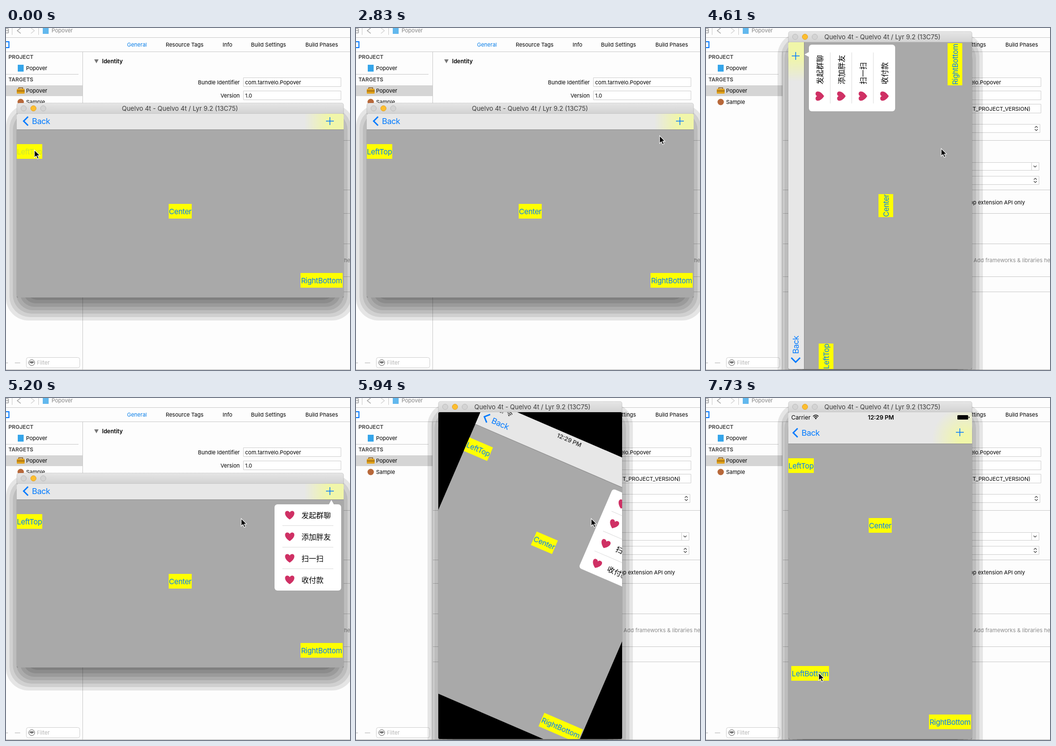
An HTML page for the animation above (8000 ms loop, 702 by 698 pixels).

```html
<!DOCTYPE html>
<html lang="en">
<head>
<meta charset="utf-8">
<title>Popover demo</title>
<style>
html, body { margin: 0; width: 100%; height: 100%; overflow: hidden; background: #fdfdfd; }
svg { display: block; width: 702px; height: 698px; font: 11px Inter, "Noto Sans", sans-serif; }
.bold { font-weight: 600; }
.end { text-anchor: end; }
.mid { text-anchor: middle; }
.rule { stroke: #c9c9c9; fill: none; }
.field { fill: #fff; stroke: #cfcfcf; }
.tint { fill: none; stroke: #007aff; }
.button { font-size: 15px; letter-spacing: -.3px; fill: #007aff; text-anchor: middle; }
.row { font: 15px "Noto Sans CJK SC", "Noto Sans CJK", sans-serif; }
</style>
</head>
<body>
<svg viewBox="0 0 702 698">
  <defs>
    <linearGradient id="glowWide"><stop stop-color="#eff5a8" stop-opacity="0"/><stop offset=".6" stop-color="#f0f6a9"/></linearGradient>
    <radialGradient id="glowTall"><stop offset=".15" stop-color="#f1f7a8"/><stop offset="1" stop-color="#f1f7a8" stop-opacity="0"/></radialGradient>
    <linearGradient id="chrome" x2="0" y2="1"><stop stop-color="#e6e6e6"/><stop offset="1" stop-color="#d2d2d2"/></linearGradient>
    <clipPath id="clip"><rect id="clipBox" rx="3"/></clipPath>
  </defs>

  <!-- editor behind -->
  <rect width="702" height="698" fill="#fdfdfd"/>
  <rect y="117" width="156" height="22" fill="#d5d5d5"/>
  <path class="rule" d="M0 19.5H702M0 48.5H702M156.5 49V697M0 94.5H148M12.5 0V14M66.5 0V14M157 229.5H702M157 330.5H702M157 378.5H702M157 440.5H702M157 507.5H702M157 538.5H702"/>
  <path d="M0 697.5H702" stroke="#b4b4b4"/>
  <path d="M0 1.5H5V10H0M0 5.5H5" fill="none" stroke="#777"/>
  <path d="M30 0L23 5.5L30 11" fill="none" stroke="#999" stroke-width="1.3"/>
  <path d="M51 0L58 5.5L51 11" fill="none" stroke="#d2d2d2" stroke-width="1.3"/>
  <rect x="75" y="-1" width="12" height="13" fill="#62b8ee"/>
  <text x="93" y="9" fill="#858585">Popover</text>
  <rect x="-6" y="28" width="12" height="12" class="tint" stroke-width="2"/>
  <text x="247" y="38" fill="#0a7fe8">General</text>
  <text x="326" y="38">Resource Tags</text>
  <text x="442" y="38">Info</text>
  <text x="500" y="38">Build Settings</text>
  <text x="611" y="38">Build Phases</text>

  <g class="bold" fill="#3d3d3d"><text x="5" y="63">PROJECT</text><text x="5" y="109">TARGETS</text></g>
  <rect x="24" y="75" width="12" height="14" fill="#35a5ea"/>
  <text x="41" y="86">Popover</text>
  <path d="M26 124V122H34V124" fill="none" stroke="#8a5a10" stroke-width="1.5"/>
  <rect x="22" y="124" width="16" height="10" rx="1.5" fill="#e0a01c"/>
  <path d="M22 128.5H38" stroke="#8a5a10" stroke-width="1.5"/>
  <text x="41" y="132">Popover</text>
  <circle cx="30" cy="151" r="6.5" fill="#b8683a"/>
  <text x="41" y="155">Sample</text>
  <path d="M0 683.5H4M18 683.5H29" stroke="#b0b0b0"/>
  <rect x="41.5" y="672.5" width="109" height="21" rx="4" class="field"/>
  <circle cx="52.5" cy="683" r="6" fill="none" stroke="#555"/>
  <path d="M49 681H56V683H49ZM50.5 684.5H54.5" fill="#555" stroke="#555" stroke-width=".8"/>
  <text x="63" y="687" fill="#b5b5b5">Filter</text>

  <path d="M180 64H189L184.5 72Z" fill="#777"/>
  <text x="196" y="72" class="bold" font-size="11.5">Identity</text>
  <text x="477" y="115" class="end">Bundle Identifier</text>
  <text x="477" y="142" class="end">Version</text>
  <path class="field" d="M484.5 101.5H683.5V119.5H484.5ZM484.5 128.5H683.5V146.5H484.5ZM484.5 155.5H683.5V173.5H484.5Z"/>
  <path class="field" d="M484.5 196.5H681.5V213.5H484.5ZM484.5 274.5H679.5V290.5H484.5ZM664.5 274.5V290.5M484.5 302.5H679.5V319.5H484.5Z"/>
  <path d="M671 203.500L674 200.500L677 203.500M671 206.500L674 209.500L677 206.500M668.500 281L671.500 284L674.500 281M669 309.500L672 306.500L675 309.500M669 312.500L672 315.500L675 312.500" fill="none" stroke="#444" stroke-width="1.200"/>
  <text x="488" y="115">com.tarnvelo.Popover</text>
  <text x="488" y="142">1.0</text>
  <text x="662" y="169" class="end">$(CURRENT_PROJECT_VERSION)</text>
  <text x="651" y="360" class="end">Allow app extension API only</text>
  <text x="546" y="478" fill="#8c8c8c">Add frameworks &amp; libraries here</text>

  <!-- simulator window -->
  <g id="shadow"></g>
  <g id="frame">
    <path id="titleBar" fill="url(#chrome)" stroke="#000" stroke-opacity=".12"/>
    <g fill="#d4d4d4" stroke="#bdbdbd"><circle cx="14" cy="11" r="5.500"/><circle cx="54" cy="11" r="5.500"/></g>
    <circle cx="34" cy="11" r="5.500" fill="#fdbe2f" stroke="#e0a32a"/>
    <text id="title" y="15.500" class="mid" font-size="13" fill="#3c3c3c">Quelvo 4t - Quelvo 4t / Lyr 9.2 (13C75)</text>
  </g>
  <g clip-path="url(#clip)">
    <rect width="702" height="698"/>
    <g id="screen">
      <rect id="page" fill="#a9a9a9"/>
      <g id="buttons"></g>
      <rect id="bar" fill="#e7e7e7"/>
      <g id="wideGlow"><rect x="-80" width="80" height="32" fill="url(#glowWide)"/></g>
      <g id="tallGlow"><path d="M-100 0H0V64H-100Z" fill="url(#glowTall)" id="tallFill"/></g>
      <path id="barLine" stroke="#8f8f8f"/>
      <g id="back">
        <path class="tint" stroke-width="2.800" d="M11 1L2 10L11 19"/>
        <text x="19" y="16" font-size="16.500" letter-spacing="-.4" fill="#007aff">Back</text>
      </g>
      <path id="plus" class="tint" stroke-width="1.500" d="M-8 0H8M0-8V8"/>
      <g id="status" font-size="12">
        <text x="6" y="14.500">Carrier</text>
        <path d="M50.500 8.500Q56 3 61.500 8.500M52.500 10.800Q56 7.300 59.500 10.800" fill="none" stroke="#000" stroke-width="1.600"/>
        <path d="M54 12.500Q56 10.500 58 12.500L56 14.500Z"/>
        <text x="189" y="14.500" class="mid bold">12:29 PM</text>
        <rect x="345" y="6" width="22" height="9" rx="1.500"/><rect x="368" y="9" width="1.500" height="3"/>
      </g>
      <g id="popovers"></g>
    </g>
  </g>
  <path id="cursor" d="M0 0V15.500L3.600 12.200L6.200 18L8.800 16.900L6.300 11.200H11Z" stroke="#fff" stroke-width="1.100"/>
</svg>

<script>
const $ = id => document.getElementById(id);
const attr = (id, values) => { for (const k in values) $(id).setAttribute(k, values[k]); };
const move = (id, x, y) => attr(id, { transform: `translate(${x} ${y})` });
const lerp = (a, b, k) => a + (b - a) * k;

const button = (id, width) => `<g id="${id}"><rect width="${width}" height="30" fill="#ff0"/>
  <text class="button" id="${id}Text" x="${width / 2}" y="20.5">${id}</text></g>`;
$('buttons').innerHTML = button('LeftTop', 52) + button('Center', 47) +
  button('RightBottom', 86) + button('LeftBottom', 77);

const heart = 'M0 9C-12.500 1-11-8.500-5-8.500C-2.500-8.500-.8-7.200 0-5.200C.8-7.200 2.500-8.500 5-8.500C11-8.500 12.500 1 0 9Z';
const popover = (id, tip) => `<g id="${id}">
  <path fill="#fff" d="M${tip - 5.5} 1L${tip} -9L${tip + 5.5} 1Z"/><rect width="136" height="176" rx="6" fill="#fff"/>` +
  ['发起群聊', '添加胖友', '扫一扫', '收付款'].map((label, i) => `<g transform="translate(0 ${i * 44})">
    <path d="${heart}" transform="translate(31 22)" fill="#cf3064"/><text class="row" x="55" y="27.5">${label}</text>
    ${i < 3 ? '<path d="M16 43.5H120" stroke="#dcdcdc"/>' : ''}</g>`).join('') + '</g>';
$('popovers').innerHTML = popover('leftMenu', 21) + popover('plusMenu', 116);

const times = [[0, 750, 6], [1050, 1200, 2], [1490, 2530, 8], [2680, 3710, 8], [3860, 4610, 2],
  [5200, 5350, 2], [5640, 6090, 4], [6540, 6690, 2], [6990, 7730, 6]]
  .flatMap(([a, b, n]) => Array.from({ length: n }, (_, i) => a + (b - a) * i / (n - 1)));

const pointer = [[0, 58, 249], [450, 58, 249], [750, 138, 279], [1050, 205, 309], [1200, 250, 329],
  [1640, 250, 329], [2530, 545, 280], [2980, 658, 189], [3710, 658, 189], [3860, 480, 246],
  [6090, 480, 246], [6540, 458, 303], [6690, 436, 361], [6990, 436, 361], [7730, 230, 561]];
const leftFade = [[150, .4], [300, 1], [1350, 1], [1635, 0]];
const plusFade = [[3200, 0], [3500, 1], [6840, 1], [7130, 0]];
const turn = [[5640, 0], [6090, 1]];

function at(keys, t) {
  const i = keys.findIndex(key => key[0] > t);
  if (i < 0) return keys.at(-1).slice(1);
  if (i === 0) return keys[0].slice(1);
  const [a, b] = [keys[i - 1], keys[i]];
  return a.slice(1).map((v, j) => lerp(v, b[j + 1], (t - a[0]) / (b[0] - a[0])));
}

function drawWindow(tall, showTitle) {
  const [x, y, w, h] = tall ? [168, 29, 375, 667] : [22, 175, 667, 375];
  move('frame', x, y - 22);
  attr('titleBar', { d: `M0 22V5Q0 0 5 0H${w - 5}Q${w} 0 ${w} 5V22Z` });
  attr('title', { x: tall ? 192 : 333, opacity: +showTitle });
  attr('clipBox', { x, y, width: w, height: h });
  $('shadow').innerHTML = Array.from({ length: 7 }, (_, i) => {
    const s = 22 - 7 * i;
    return `<rect x="${x - s}" y="${y - 19 + 7 * i}" width="${w + 2 * s}" height="${h + 66 - 14 * i}"
      rx="${46 - 4 * i}" fill-opacity=".095"/>`;
  }).join('');
  return [x + w / 2, y + h / 2];
}

function drawScreen(cx, cy, angle, k, t) {
  const w = lerp(667, 375, k), h = lerp(375, 667, k), top = lerp(32, 64, k);
  attr('screen', { transform: `translate(${cx} ${cy}) rotate(${angle}) translate(${-w / 2} ${-h / 2})` });
  attr('page', { width: w, height: h });
  attr('bar', { width: w, height: top });
  attr('barLine', { d: `M0 ${top + .5}H${w}` });
  move('wideGlow', w, 0);
  move('tallGlow', w, 0);
  attr('wideGlow', { opacity: 1 - k });
  attr('tallGlow', { opacity: k });
  attr('status', { opacity: k });
  move('back', lerp(12, 8, k), lerp(5, 32, k));
  move('plus', w - lerp(28, 25, k), lerp(15, 41, k));
  attr('plus', { opacity: t > 3100 && t < 3200 ? .2 : 1 });
  move('LeftTop', 0, top + 30);
  attr('LeftTopText', { opacity: t < 150 ? .2 : 1 });
  move('Center', w / 2 - 23.5, top + 152);
  move('RightBottom', w - 88, h - 50);
  move('LeftBottom', 6, top + 454);
  move('leftMenu', 5, top + 70);
  move('plusMenu', w - 141, top + 10);
  attr('leftMenu', { opacity: t < 150 ? 0 : at(leftFade, t)[0] });
  attr('plusMenu', { opacity: at(plusFade, t)[0] });
}

// Place the portrait glow near the bar's lower right corner.
attr('glowTall', { gradientUnits: 'userSpaceOnUse', cx: -14, cy: 56, r: 68 });

function draw() {
  const now = performance.now() % 8000;
  const t = times.findLast(v => v <= now);
  const flipped = t >= 4610 && t < 5200;
  const portrait = t >= 5640;
  const blank = (t >= 5200 && t < 5350) || (t >= 5640 && t < 5790);
  const [cx, cy] = drawWindow(flipped || portrait, !blank);
  const [p] = at(turn, t), k = p * p * (3 - 2 * p);
  drawScreen(cx, cy, flipped ? -90 : portrait ? 90 * (1 - k) : 0, k, t);
  move('cursor', ...at(pointer, t));
  requestAnimationFrame(draw);
}
draw();
</script>
</body>
</html>
```
